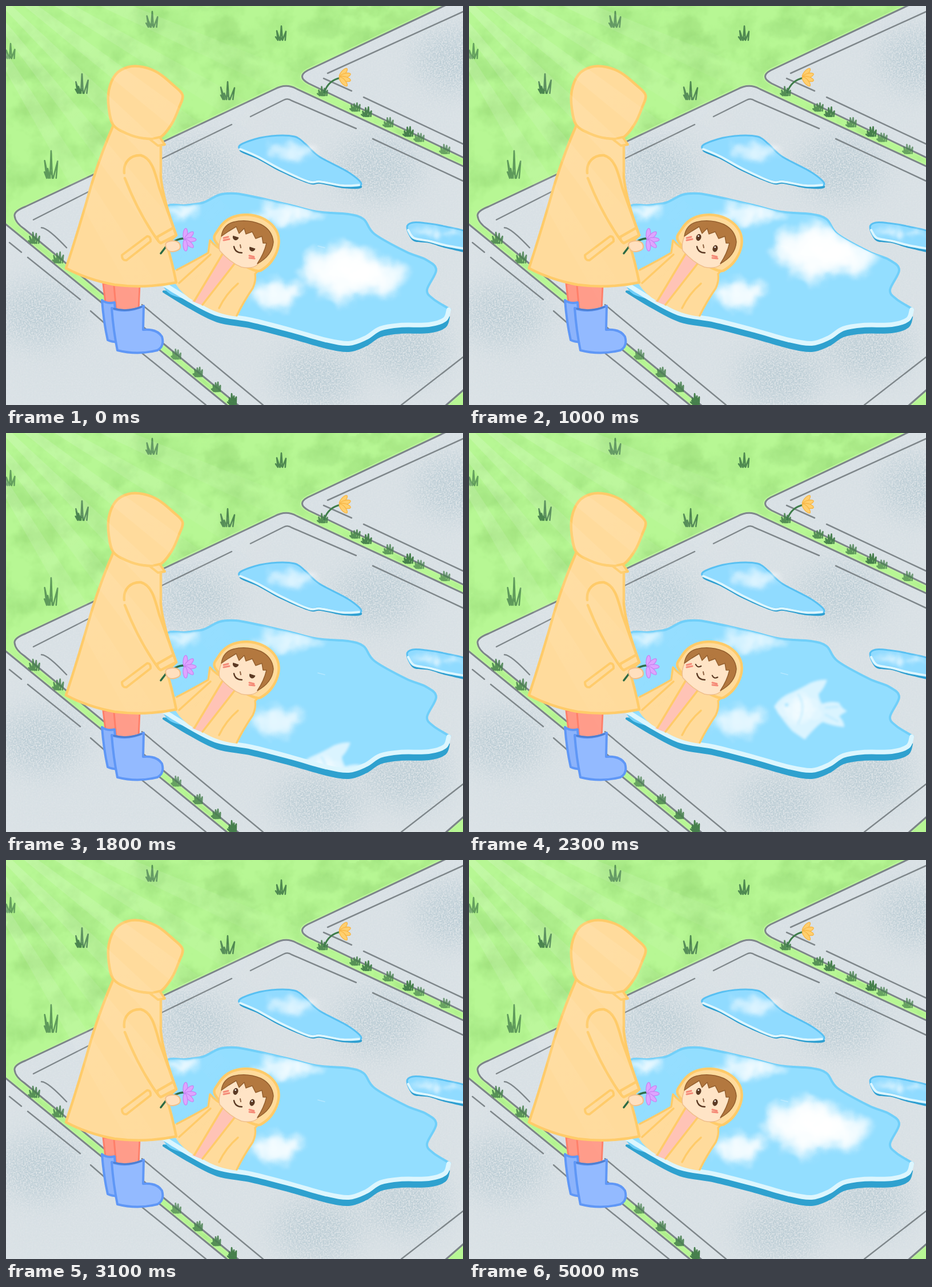
These frames come from a looping animation (800x700 px, 5.2 s). An HTML page:

```html
<!DOCTYPE html>
<html lang="en">
<head>
<meta charset="utf-8">
<title>Puddle sky</title>
<style>
html, body { margin: 0; width: 100%; height: 100%; overflow: hidden; background: #b5f391; }
svg { position: absolute; left: 0; top: 0; width: 800px; height: 700px; will-change: transform; }
path, ellipse { stroke-linecap: round; stroke-linejoin: round; }
</style>
</head>
<body>
<svg id="ground" viewBox="0 0 800 700"></svg>
<svg id="scene" viewBox="0 0 800 700"></svg>
<script>
// ---------- helpers ----------
// Smooth Catmull-Rom path through "x,y x,y ..." points
function curve(text, closed) {
  const p = text.trim().split(/\s+/).map(s => s.split(',').map(Number));
  const n = p.length;
  const at = i => closed ? p[(i + n) % n] : p[Math.max(0, Math.min(n - 1, i))];
  let d = 'M' + p[0];
  for (let i = 0; i < (closed ? n : n - 1); i++) {
    const [a, b, c, e] = [at(i - 1), at(i), at(i + 1), at(i + 2)];
    d += `C${b[0] + (c[0] - a[0]) / 6} ${b[1] + (c[1] - a[1]) / 6} ` +
         `${c[0] - (e[0] - b[0]) / 6} ${c[1] - (e[1] - b[1]) / 6} ${c[0]} ${c[1]}`;
  }
  return closed ? d + 'Z' : d;
}
const shape = (d, fill, stroke = 'none', w = 4, more = '') =>
  `<path d="${d}" fill="${fill}" stroke="${stroke}" stroke-width="${w}" ${more}/>`;
const line = (d, stroke, w = 3, more = '') => shape(d, 'none', stroke, w, more);
const blob = (x, y, rx, ry, fill, more = '') =>
  `<ellipse cx="${x}" cy="${y}" rx="${rx}" ry="${ry}" fill="${fill}" ${more}/>`;
const repeat = (n, make) => Array.from({ length: n }, (_, i) => make(i)).join('');
const full = 'filterUnits="userSpaceOnUse" x="0" y="0" width="800" height="700" color-interpolation-filters="sRGB"';

let seed = 11;
const rnd = (lo = 0, hi = 1) => lo + (hi - lo) * ((seed = seed * 16807 % 2147483647) / 2147483647);

// Soft puffs spread evenly over an ellipse, larger near the middle
function puffs(cx, cy, rx, ry, n = 18, opacity = .4) {
  return repeat(n, i => {
    const d = Math.sqrt((i + .5) / n), a = i * 2.4 + rnd(0, .6);
    const r = ry * (.55 - .25 * d);
    return blob(cx + Math.cos(a) * d * (rx - r), cy + Math.sin(a) * d * (ry - r), r * 1.2, r, '#fff', `opacity="${opacity}"`);
  });
}
// Petals fanned out to the right of their base
const fan = (x, y, n, spread, size, fill, edge) => repeat(n, i =>
  `<ellipse cx="${size}" rx="${size}" ry="${size * .38}" fill="${fill}" stroke="${edge}" stroke-width="1.3" ` +
  `transform="translate(${x} ${y}) rotate(${(i / (n - 1) - .5) * spread})"/>`);

// ---------- ground ----------
const slabs = 'M15 368Q14 360 34 352L470 146Q490 135 508 145L830 295V648L765 705H412L32 391Q16 380 15 368Z' +
  'M830 -30L528 113Q508 124 530 136L830 280ZM-10 375L395 707H-10Z';
const seams = 'M48 375L152 322M272 268L395 208M428 194L486 165Q493 161 500 166L613 215M642 233L800 307' +
  'M62 389Q72 388 106 424M238 524L450 700M563 118L800 10M556 127L605 149M626 160L800 242' +
  'M6 415L27 432M38 441L130 515M148 535L172 556M195 574L350 700M692 700L800 616';

function tuft(x, y, w, h, n) {
  const d = repeat(n, i => {
    const u = (i + .5) / n - .5;
    const tall = h * (1 - 1.1 * Math.abs(u)) * rnd(.75, 1);
    return `M${x + u * w * .5 - 4} ${y - tall * .35}L${x + u * w * .5} ${y}L${x + u * w + 2} ${y - tall}L${x + u * w * .6 + 4} ${y}`;
  });
  return line(d, '#467f4c', 2.6, `opacity="${rnd(.7, 1)}"`);
}
const lawnTufts = [[6, 92, 22, 30], [254, 37, 28, 32], [480, 60, 24, 30], [131, 153, 32, 40], [386, 164, 36, 40], [77, 302, 34, 54]]
  .map(([x, y, w, h]) => tuft(x, y, w, h, 3)).join('');
const upperTufts = [553, 610, 630, 668, 703, 722, 767].map(x => tuft(x, 157 + (x - 553) * .475, 20, 19, 4)).join('');
const lowerTufts = [48, 90, 297, 335, 367, 395].map(x => tuft(x, 377 + x * .815, 24 - x * .02, 22, 4)).join('');

const shades = repeat(36, () => {
  const x = rnd(0, 800);
  return blob(x, rnd(0, 350 - x * .38), rnd(14, 48), rnd(8, 26), '#8fd070', `opacity="${rnd(.1, .3)}"`);
});
const damp = [[790, 95], [330, 290], [650, 285], [545, 650], [60, 540], [700, 600]]
  .map(([x, y]) => blob(x, y, 75, 55, '#bccdd5')).join('');

ground.innerHTML = `<defs>
  <clipPath id="onSlab"><path d="${slabs}"/></clipPath>
  <filter id="grain" ${full}>
    <feGaussianBlur stdDeviation="24" result="soft"/>
    <feTurbulence type="fractalNoise" baseFrequency=".4" numOctaves="2" seed="4"/>
    <feColorMatrix values="0 0 0 0 0  0 0 0 0 0  0 0 0 0 0  3 0 0 0 -.9"/>
    <feComposite in="soft" operator="in"/>
  </filter>
  <filter id="wash" ${full}>
    <feTurbulence type="fractalNoise" baseFrequency=".022" numOctaves="4" seed="9"/>
    <feColorMatrix values="0 0 0 0 .55  0 0 0 0 .82  0 0 0 0 .42  2.6 0 0 0 -1.1"/>
  </filter>
  <filter id="ragged" ${full}>
    <feGaussianBlur stdDeviation="5" result="b"/>
    <feTurbulence type="fractalNoise" baseFrequency=".05" numOctaves="3" result="n"/>
    <feDisplacementMap in="b" in2="n" scale="26" xChannelSelector="R" yChannelSelector="G"/>
  </filter>
</defs>
<rect width="800" height="700" fill="#b7f794"/>
<rect width="800" height="700" filter="url(#wash)" opacity=".34"/>
<g filter="url(#ragged)">${shades}</g>
${line(slabs, '#bdf59c', 7)}
${shape(slabs, '#dce3e7')}
<g clip-path="url(#onSlab)" filter="url(#grain)">${damp}<rect width="800" height="700" fill="#bccdd5" opacity=".12"/></g>
${line(slabs, '#7c8489', 3)}
${line(seams, '#7f878b', 2.5)}
${lawnTufts + upperTufts + lowerTufts}
${line('M557 152Q564 130 586 126', '#3f7d4a', 3)}
${fan(584, 125, 4, 100, 10, '#ffcf6e', '#f8b646')}`;

// ---------- puddles ----------
const bank = '262,372 285,350 312,350 345,345 374,331 402,329 440,336 500,350 545,361 598,365 626,374 645,400 700,431 735,445 753,463 737,498 748,514 775,531';
const shore = '775,533 768,550 740,559 690,560 655,566 630,582 600,592 560,586 500,569 430,551 370,540 320,515 276,488';
const pool = curve(bank + ' ' + shore, true);
const pond = '408,249 425,237 465,228 505,229 524,242 548,264 600,292 622,313 592,315 550,307 530,307 480,286 440,264';
const pond2 = '702,388 712,380 735,381 770,387 815,400 815,427 770,420 740,411 712,407';

const bigCloud = puffs(588, 466, 78, 60, 26, .36) + puffs(655, 475, 56, 40, 20, .32) + puffs(618, 466, 46, 26, 8, .5);
const stillClouds = puffs(472, 505, 56, 34, 20, .34) + puffs(490, 365, 66, 27, 22, .36) + puffs(308, 359, 34, 18, 12, .42);
const fishBody = 'M534 480Q545 462 565 455Q585 446 598 438Q614 432 627 433Q622 448 612 458Q613 468 618 475Q634 469 648 473' +
  'Q651 482 662 488Q654 492 648 497Q657 506 657 516Q636 514 619 507Q610 513 604 520Q594 530 588 538Q576 530 566 523Q550 506 534 480Z';
const fish = shape(fishBody, '#fff', 'none', 0, 'opacity=".66"') + puffs(580, 485, 40, 34, 10, .2) +
  line('M576 458Q592 480 576 510M624 482L646 480M624 494L646 506', '#a6e3ff', 2.5, 'opacity=".6"') +
  blob(556, 477, 3, 3, '#a6e3ff');

function smallPond(points, rim, gloss) {
  const d = curve(points, true);
  return shape(d, '#2f9fd0', 'none', 0, 'transform="translate(1 5)"') + shape(d, '#90dbff', '#58c0f2', 3) +
    `<g filter="url(#mist)">${gloss}</g>` + line(curve(rim), '#dcf6ff', 4);
}

// ---------- walker ----------
const coat = '#ffdb9c', trim = '#ffcb69';
const hood = curve('188,209 180,180 180,148 192,120 214,107 240,107 266,117 292,138 309,156 303,178 290,207 269,231 240,232 212,224', true);
const robe = 'M188 209Q166 260 150 312Q128 390 105 460Q142 480 190 489Q245 496 298 485Q290 445 281 418L298 402Q275 340 271 300V235Z';
const walker =
  shape('M170 487L174 520H193V488Z', '#ff9885', '#ff7f69', 3) +
  shape('M189 490L193 535H232L234 490Z', '#ff9c8a', '#ff7f69', 3) +
  shape('M168 516Q176 523 190 520L196 590Q184 589 178 586Q171 555 168 516Z', '#8cb3fb', '#5f97f6', 4) +
  shape('M185 530Q212 540 241 526L240 568Q264 566 273 580Q278 597 265 604Q230 613 195 604Q188 570 185 530Z', '#93baff', '#5f97f6', 4) +
  line('M189 531Q212 537 237 528', '#4e7fd0', 3) +
  shape(robe, coat, trim, 4.5) +
  line('M271 434L281 421M296 412Q306 407 316 408', '#2c6a44', 3.5) +
  fan(313, 410, 5, 170, 10, '#dda4ff', '#c983f2') +
  shape(curve('280,416 292,412 303,416 304,426 292,431 282,427', true), '#ffdfbd', '#f3bd84', 2) +
  line('M207 293C205 274 218 261 236 262C254 266 260 288 268 318L298 402', trim, 4.5) +
  line('M208 302Q232 364 265 410M298 402L271 416Q264 412 265 405L293 389', trim, 4.5) +
  shape('M203 437L247 404Q254 404 253 413L211 446Q203 447 203 437Z', coat, trim, 4) +
  shape(hood, coat, trim, 4.5) +
  shape('M252 234L269 230L278 243L266 245Z', coat, trim, 4);

// ---------- mirrored child ----------
const ink = '#5b3a24', hair = '#b3783f', hairEdge = '#95602f';
const eyeArt = {
  open: blob(0, 0, 4.4, 6, ink) + blob(-1, -2.2, 1.4, 1.4, '#fff'),
  half: shape('M-4.8 -1A4.8 5.4 0 0 0 4.8 -1Z', ink, ink, 1),
  shut: line('M-5 1.5Q0 7 5 1.5', ink, 2.2)
};
const eyes = Object.keys(eyeArt).map(k => `<g id="${k}">` + [[402, 406], [431, 425.5]].map(([x, y]) =>
  `<g transform="translate(${x} ${y}) rotate(18)">${eyeArt[k]}</g>`).join('') + '</g>').join('');
const child =
  shape('M378 428L404 446L398 480L346 526L326 518Z', '#ffc3b6') +
  shape('M296 463Q330 447 354 433L357 411Q368 424 382 430L330 518Q308 506 296 486Z', coat) +
  line('M299 463Q330 447 354 433L357 411Q368 424 382 430L330 517M303 486L358 436', trim, 3.5) +
  shape('M405 447L432 461L449 456L436 470Q438 482 432 495Q415 520 404 545Q370 541 343 524Z', coat) +
  line('M344 524L404 447L432 461L449 456L436 470Q438 482 432 495Q415 520 404 543M406 487Q385 505 373 530', trim, 3.5) +
  shape(curve('366,412 372,392 388,375 410,367 436,368 460,379 475,398 477,420 468,443 452,460 436,464 400,445', true), coat, trim, 4.5) +
  shape('M378 402Q371 418 374 429Q392 450 412 458Q430 462 440 454Q454 436 458 417L450 400L432 388L404 384Z', '#ffe4c6', '#f0bf8d', 1.5) +
  shape('M377 404Q380 384 398 379Q422 373 446 383Q466 393 468 414Q466 438 440 452Q452 434 456 416L450 416L448 404L437 408' +
    'L431 396L420 400L417 390L408 399L403 387L390 395Z', hair, hairEdge, 1.5) +
  line('M381 407L389 405M381 411L391 409M426 438L434 440M426 442L435 443', '#f58b78', 3) +
  line('M399 422Q401 433 413 433', ink, 2.3) + line('M410 419L411 424', '#8d6242', 2) + eyes;

// ---------- light ----------
const rays = repeat(6, i => {
  const end = deg => [Math.cos(deg * Math.PI / 180) * 950 - 150, Math.sin(deg * Math.PI / 180) * 950 - 150];
  const a = 22 + i * 7;
  return shape(`M-150 -150L${end(a)}L${end(a + 3.5)}Z`, 'url(#ray)');
});

scene.innerHTML = `<defs>
  <clipPath id="inPool"><path d="${pool}"/></clipPath>
  <radialGradient id="ray" gradientUnits="userSpaceOnUse" cx="-150" cy="-150" r="800">
    <stop offset=".2" stop-color="#fff" stop-opacity=".17"/><stop offset="1" stop-color="#fff" stop-opacity="0"/>
  </radialGradient>
  <filter id="mist" ${full}>
    <feGaussianBlur stdDeviation="4" result="b"/>
    <feTurbulence type="fractalNoise" baseFrequency=".04" numOctaves="2" seed="3" result="n"/>
    <feDisplacementMap in="b" in2="n" scale="18" xChannelSelector="R" yChannelSelector="G"/>
  </filter>
  <filter id="chalk" ${full}>
    <feGaussianBlur stdDeviation="2"/>
  </filter>
</defs>
${smallPond(pond, '410,251 440,264 480,286 530,308 550,308 590,315 618,314', puffs(500, 255, 50, 22, 16, .3))}
${smallPond(pond2, '704,393 714,407 740,412 770,420 805,426', puffs(752, 398, 46, 13, 14, .4))}
${shape(curve(shore) + 'Z', '#2fa1cf', '#2fa1cf', 4, 'transform="translate(0 13)"')}
${shape(pool, '#93deff', '#70cff9', 4)}
<g clip-path="url(#inPool)">
  <g id="still" filter="url(#mist)">${stillClouds}</g>
  ${line('M546 421L558 424', '#b4e8ff', 1.5)}
  <g id="cloud"><g filter="url(#mist)">${bigCloud}</g></g>
  <g id="fish"><g filter="url(#chalk)">${fish}</g></g>
</g>
${line(curve(shore), '#dcf6fe', 8)}
${child}
${walker}
${rays}`;

// ---------- motion: poses held for 200 ms ----------
const loop = 5200, beat = 200;
const byId = id => document.getElementById(id);
const within = (t, from, to) => t >= from && t < to;

function lidAt(t) {
  if (within(t, 200, 400) || within(t, 2100, 2900)) return 'shut';
  return within(t, 0, 600) || within(t, 1800, 3100) ? 'half' : 'open';
}
// Beats away from the resting place; null while out of sight
function cloudBeat(t) {
  if (t >= 4600) return Math.min(0, Math.floor((t - 5000) / beat));
  return t < 1600 ? Math.max(0, Math.floor((t - 800) / beat)) : null;
}
const fishBeat = t => within(t, 1800, 3100) ? Math.max(-2, Math.floor((t - 2300) / beat)) : null;

// Drifts up and right, faster on the way in
function place(id, k, dx) {
  const el = byId(id);
  el.style.display = k === null ? 'none' : '';
  if (k !== null) el.setAttribute('transform', `translate(${k * dx} ${-k * (k < 0 ? 55 : 36)})`);
}
let shown = '';
function draw(t) {
  const lid = lidAt(t), c = cloudBeat(t), f = fishBeat(t);
  const key = [lid, c, f].join('|');
  if (key === shown) return;
  shown = key;
  for (const k in eyeArt) byId(k).style.display = k === lid ? '' : 'none';
  place('cloud', c, 15);
  place('fish', f, 12);
  byId('still').setAttribute('opacity', within(t, 1800, 3100) ? .84 : 1);
}
const start = performance.now();
function tick() {
  draw((performance.now() - start) % loop);
  requestAnimationFrame(tick);
}
tick();
</script>
</body>
</html>
```
